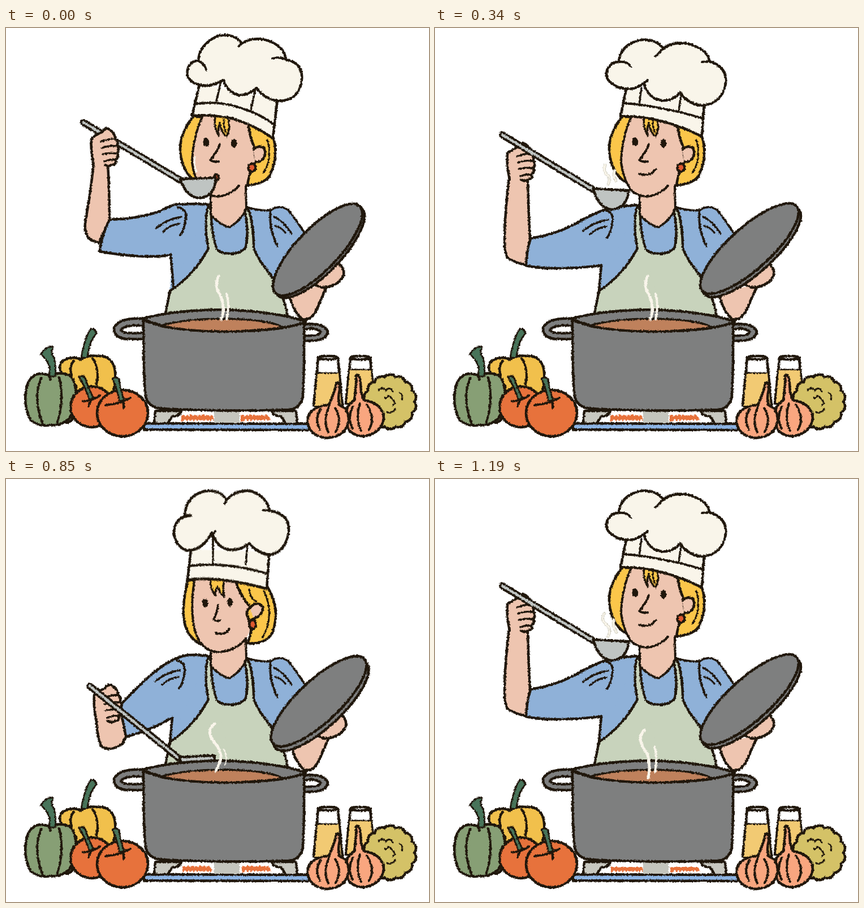
Write an HTML page that moves like this. It is 748 by 748 pixels and loops after 1360 ms.

```html
<!DOCTYPE html>
<html lang="en">
<head>
<meta charset="utf-8">
<title>Tasting the soup</title>
<style>
html, body { margin: 0; width: 100%; height: 100%; overflow: hidden; background: #fff; }
svg { display: block; width: 100vw; height: 100vh; }
</style>
</head>
<body>
<svg viewBox="0 0 748 748">
  <defs>
    <filter id="rough" filterUnits="userSpaceOnUse" x="0" y="0" width="748" height="748" color-interpolation-filters="sRGB">
      <feTurbulence type="fractalNoise" baseFrequency="0.35" numOctaves="2" seed="4"/>
      <feDisplacementMap in="SourceGraphic" scale="4" xChannelSelector="R" yChannelSelector="G"/>
    </filter>
  </defs>
  <g filter="url(#rough)" stroke-linecap="round" stroke-linejoin="round">
    <g id="cook"></g>
    <g id="still"></g>
    <g id="steam"></g>
  </g>
</svg>
<script>
const INK = '#20170c', SKIN = '#eec5b0', HAIR = '#fbc64a', BLUE = '#8fb1d8', SAGE = '#c8d3bc',
  IRON = '#7e7f7f', CREAM = '#f9f5ea', STEEL = '#bfc4c2', LEAF = '#48745a', ORANGE = '#e7723c',
  BEER = '#f2ca73', GARLIC = '#f9a67f';
const STEP = 170;
const $ = id => document.getElementById(id);

const path = (d, fill = 'none', stroke = INK, w = 4.5) =>
  `<path d="${d}" fill="${fill}" stroke="${stroke}" stroke-width="${w}"/>`;
const flat = (d, fill) => path(d, fill, 'none');
const line = (d, w = 4) => path(d, 'none', INK, w);
const oval = (x, y, rx, ry, fill, turn = 0, stroke = INK) =>
  `<ellipse rx="${rx}" ry="${ry}" fill="${fill}" stroke="${stroke}" stroke-width="4.5" transform="translate(${x} ${y}) rotate(${turn})"/>`;
const move = (x, y, body) => `<g transform="translate(${x} ${y})">${body}</g>`;

// Kitchen objects
function scallop(cx, cy, rx, ry, n) {
  const at = k => {
    const a = k / n * 2 * Math.PI - 1.8;
    return (cx + rx * Math.cos(a)).toFixed(1) + ' ' + (cy + ry * Math.sin(a)).toFixed(1);
  };
  let d = 'M' + at(0);
  for (let k = 1; k <= n; k++) d += `A12.5 12.5 0 0 1 ${at(k)}`;
  return d + 'Z';
}

function flame(x0, x1, kind) {
  const round = kind % 2 === 0;
  let d = `M${x0 + kind} 696L${x0 + kind} 686`;
  for (let x = x0 + kind; x < x1 - 7; x += 7)
    d += round ? `q3.5 ${-5 + (x + kind) % 3} 7 0` : 'l7 0';
  d += 'L' + x1 + ' 695';
  for (let x = x1; x > x0 + 7; x -= 6) d += 'l-3 -3l-3 3';
  return flat(d + 'Z', ORANGE);
}

const stove = kind =>
  path('M244 699L536 700L536 711L244 710Z', '#8db4e4') +
  path('M262 697L264 677L310 677Q308 686 294 687L287 697', '#c8c8c0') +
  path('M515 697L513 677L470 677Q472 686 487 687L493 697', '#c8c8c0') +
  flame(310, 368, kind) + flame(415, 469, kind) +
  flat('M368 678L413 678L413 698L368 698Z', '#c4c5bd');

const pot =
  path('M241 514Q200 512 191 530Q190 548 214 550L242 550', IRON) +
  path('M240 526Q212 524 203 533Q205 542 240 539', '#fff') +
  path('M527 524Q560 520 569 536Q569 550 546 553L526 553', IRON) +
  path('M529 532Q550 530 557 537Q554 545 529 544', '#fff') +
  path('M243 516Q243 600 246 648Q250 671 275 673Q390 679 500 675Q522 673 525 650Q528 590 527 520Z', IRON) +
  path('M241 514Q300 498 388 498Q480 502 530 519Q500 535 388 537Q285 535 241 514Z', IRON) +
  path('M273 527Q310 514 390 514Q470 516 491 530Q460 536 388 536.5Q310 536 273 527Z', '#bf815c', INK, 3.5) +
  line('M243 517Q290 536 388 537Q490 534 528 521');

const vegetables =
  path('M132 586Q112 578 97 592Q93 602 98 609L124 632L125 650L188 650Q196 620 192 602Q186 578 160 580Q145 578 132 586Z', '#f1c04c') +
  line('M120 588Q111 600 116 614') + line('M153 584Q166 602 160 630') +
  path('M133 584Q138 550 150 532Q158 531 160 540Q148 552 144 582Z', LEAF, INK, 3) +
  path('M98 694Q112 704 119 688L112 670Z', '#879f75') +
  path('M77 614Q48 604 38 630Q28 665 44 694Q60 706 78 702Q94 704 104 696Q119 690 123 660Q126 625 112 614Q94 607 77 614Z', '#879f75') +
  line('M62 619Q47 655 65 700') + line('M94 617Q104 660 90 700') + line('M77 616L78 622') +
  path('M76 616Q82 595 62 577Q68 564 82 563Q83 569 80 573Q90 590 87 616Z', LEAF, INK, 3) +
  oval(152, 670, 38, 36, ORANGE) + line('M136 660Q150 660 166 650') + line('M152 657Q146 664 146 669') +
  path('M129 617Q136 613 140 619Q146 638 155 655L147 656Q140 634 129 617Z', LEAF, INK, 3) +
  oval(206, 681, 45, 41, ORANGE) + line('M176 667Q200 665 220 654') + line('M206 660Q209 666 208 672') +
  path('M188 620Q196 615 200 622Q202 640 209 658L201 660Q197 640 188 620Z', LEAF, INK, 3);

function glass(l, r, foam, end) {
  return path(`M${l} 584L${r} 584L${r + 8} ${end}L${l - 8} ${end}Z`, '#fff') +
    flat(`M${l - 1} ${foam}L${r + 1} ${foam}L${r + 6} ${end}L${l - 6} ${end}Z`, BEER) +
    line(`M${l} ${foam}L${r} ${foam}`, 2.5) +
    oval((l + r) / 2, 583, (r - l) / 2, 3, '#fff');
}

const pantry =
  glass(552, 587, 610, 668) + glass(609, 644, 604, 664) +
  path(scallop(679, 661, 43, 45, 14), '#d4c267') +
  line('M659 641q7 -8 12 0q8 -8 13 2', 3) + line('M670 655q9 -8 13 2q8 6 1 10', 3) +
  line('M674 679q9 4 14 -5', 3) + line('M697 645q6 6 3 12', 3) +
  path('M616 658Q620 630 619 614Q626 610 627 630Q628 650 633 658Q667 664 668 690Q664 717 632 722Q602 720 600 692Q600 668 616 658Z', GARLIC) +
  line('M626 664Q617 690 628 712') + line('M638 666Q654 690 642 710') + line('M613 670Q603 690 613 708') +
  path('M571 666Q581 645 584 628Q591 623 590 640Q586 656 590 667Q606 672 606 694Q602 722 568 725Q535 722 533 694Q535 670 571 666Z', GARLIC) +
  line('M571 670Q560 695 570 715') + line('M582 672Q595 692 583 714') + line('M556 674Q545 692 555 710');

// Head, seen turned aside
const neck =
  flat('M362 285L362 330Q382 351 396 352Q419 337 425 318L425 250Z', SKIN) +
  line('M362 298L362 331Q382 351 396 352Q419 337 425 318L424 278');

const sideHead =
  path('M332 156Q307 185 308 218Q311 255 336 272L350 158Z', HAIR) +
  flat('M345 155Q330 195 330 235Q335 275 350 290Q365 300 382 297Q405 290 425 276L442 235L430 160Z', SKIN) +
  line('M347 157Q330 195 329 238Q335 275 350 290Q365 300 382 297Q402 291 412 279') +
  path('M428 164Q430 192 440 213L440 238Q430 255 427 278Q455 276 466 262Q483 225 472 192Z', HAIR) +
  line('M462 198Q472 232 455 256', 3) +
  path('M438 215Q446 206 456 212Q462 225 452 234Q445 239 440 236', SKIN) +
  flat('M436 218L441 236L432 240Z', SKIN) +
  oval(435, 247, 6.5, 7, '#df5a30') +
  path('M370 156Q367 175 376 190Q374 178 378 168Q380 184 390 192Q398 176 392 158', HAIR, INK, 3.5) +
  line('M385 162Q385 176 389 184', 3);

const frontHead =
  path('M322 178Q312 215 314 245Q318 280 346 293L345 180Z', HAIR) +
  flat('M333 178Q325 230 334 268Q345 305 375 306Q410 304 426 280L442 240L414 175Z', SKIN) +
  line('M333 180Q325 230 334 268Q345 305 375 306Q408 304 424 282') +
  path('M406 180Q416 210 432 226Q422 236 428 245L434 262Q432 280 427 291Q460 292 471 272Q486 230 463 192Z', HAIR) +
  line('M430 195Q432 212 442 216', 3) + line('M456 198Q476 240 454 280', 3) +
  path('M431 228Q444 214 454 226Q455 241 438 247', SKIN) +
  oval(436, 257, 6, 8, '#df5a30') +
  path('M361 178Q362 196 370 206Q370 196 374 190Q378 202 386 209Q382 194 386 180', HAIR, INK, 3.5);

const eyes = (x1, y1, x2, y2) =>
  oval(x1, y1, 3, 5.5, INK) + oval(x2, y2, 3, 5.5, INK);
const sideNose = line('M378 206Q372 221 361 234Q370 238 376 236');

const faces = {
  sip: sideHead + eyes(354, 202, 403, 204) + sideNose + oval(372, 264, 4, 5, '#c24a2c'),
  savour: sideHead + line('M345 203q6 9 13 0') + line('M392 208q8 9 16 0') +
    line('M376 211Q371 228 362 238Q367 241 373 239') + oval(372, 264, 3, 3, '#c24a2c'),
  smile: sideHead + eyes(354, 201, 404, 204) + sideNose + line('M361 258Q380 264 390 250'),
  front: frontHead + eyes(352, 219, 396, 218) + line('M375 223Q373 238 367 249Q374 252 378 250') +
    line('M371 272Q388 278 395 265')
};

const hat = (band, stripe, pleats, puff, detail) =>
  path(band, CREAM) + line(stripe) + line(pleats, 3.5) + path(puff, CREAM) + line(detail);

const hats = {
  sip: hat('M342 100L329 155Q360 152 400 160Q440 172 472 195L480 126', 'M335 134Q380 128 420 143Q455 155 475 172',
    'M380 95L372 130M441 108L433 145',
    'M340 58Q342 28 375 14Q402 8 417 27Q440 13 468 24Q493 35 495 56Q526 62 523 92Q518 128 484 129Q460 128 443 106Q420 126 402 115Q390 108 384 92Q362 106 340 100Q315 92 322 70Q328 57 340 58Z',
    'M340 58Q352 64 354 74M472 54Q484 50 495 56M417 27L412 32'),
  savour: hat('M341 98L330 155Q400 150 470 186L476 126', 'M334 131Q400 128 474 160',
    'M384 92L378 126M440 110L434 139',
    'M338 54Q345 20 380 14Q402 13 416 27Q440 11 468 28Q488 40 490 56Q528 64 524 95Q515 130 482 131Q462 128 446 107Q425 122 405 114Q392 106 386 92Q365 106 340 99Q309 90 316 68Q322 54 338 54Z',
    'M338 54Q350 56 355 66M478 57L490 56M416 27L408 35'),
  smile: hat('M339 104L328 156Q400 155 472 192L476 132', 'M335 133Q400 138 474 160',
    'M365 106L361 136M435 118L431 147',
    'M325 60Q328 28 365 21Q390 19 404 36Q425 21 455 30Q484 41 485 59Q517 68 514 98Q508 135 470 137Q445 133 434 114Q415 134 390 126Q374 116 369 98Q350 113 325 105Q299 95 304 75Q310 60 325 60Z',
    'M325 60Q340 58 346 68M472 60L485 59M404 36L390 50M369 98L376 92'),
  front: hat('M327 128L321 178Q380 172 461 193L466 132', 'M327 155Q390 148 462 168',
    'M366 106L366 150M427 118L424 153',
    'M316 72Q318 40 350 32Q378 28 390 46Q408 28 435 32Q462 42 466 64Q502 69 500 98Q495 133 465 137Q445 134 430 118Q410 134 385 126Q370 118 364 100Q348 130 320 130Q298 122 297 98Q300 73 326 72Z',
    'M316 72L327 72M455 63L466 64M390 46L387 52M364 106L370 98')
};

// Limbs and tools
const fist =
  path('M155 242Q149 215 151 196Q160 188 170 184Q176 174 184 180Q193 187 193 195Q200 203 196 208Q202 214 197 221Q200 229 193 233Q198 240 188 242Q182 246 175 242', SKIN) +
  line('M168 201Q180 196 193 196', 3.5) + line('M170 212Q184 207 196 209', 3.5) +
  line('M171 223Q184 220 196 222', 3.5) + line('M174 236Q184 232 193 233', 3.5);

const ladle = (x, y, bx, by, turn) => {
  const rod = `M${x} ${y}L${bx} ${by + 2}`;
  return path(rod, 'none', INK, 12) + path(rod, 'none', STEEL, 4.5) +
    `<g transform="translate(${bx} ${by}) rotate(${turn})">` +
    path('M0 0L63 0Q61 33 33 35Q10 33 0 0Z', STEEL) + '</g>';
};

const lid = (x, y, rx, turn, rim) =>
  oval(x + 4, y + rim, rx, 37, IRON, turn) + oval(x, y, rx, 37, IRON, turn);

const rightArm =
  path('M499 465Q506 500 524 515Q540 519 551 494L568 455', SKIN) +
  path('M580 411Q600 422 597 437Q588 457 560 459Q548 456 540 450', SKIN);

const torso =
  flat('M300 318L360 312L427 316Q450 324 468 322Q484 312 500 322Q516 342 532 370L478 448L440 395L380 440L290 464L294 400Z', BLUE) +
  line('M430 318Q450 324 468 322Q484 312 498 321Q514 340 530 366') +
  line('M468 322Q464 352 480 386') + line('M474 334Q490 340 505 364', 3.5) + line('M476 350Q486 352 494 362', 3.5) +
  path('M357 314Q350 350 358 390Q332 438 290 465L282 506L498 510Q492 470 466 434Q440 402 438 386Q438 345 427 317L422 322Q430 360 424 388Q415 400 395 399Q374 398 371 387Q362 355 363 332Z', SAGE);

const folds = line('M304 317Q322 320 317 342Q314 360 308 366') +
  line('M266 354Q284 338 310 334', 3.5) + line('M278 360Q290 348 307 346', 3.5);

const poses = {
  sip: {
    face: 'sip', hand: [0, 0], ladle: [137, 167, 308, 267, -2], lid: [551, 392, 107, -46, 4], arm: 0, fold: [0, 0],
    fore: 'M155 238Q150 290 140 345Q138 372 156 377L164 380L183 340Q183 290 180 240',
    sleeve: 'M358 312Q330 310 314 312Q300 308 270 325Q230 338 183 339Q172 360 165 395Q200 402 245 404Q280 404 291 401L296 457'
  },
  savour: {
    face: 'savour', hand: [-6, 20], ladle: [130, 187, 309, 268, -4], lid: [551, 394, 109, -43, 6], arm: 4, fold: [3, -2],
    fore: 'M149 258Q143 310 137 350Q135 377 158 387L169 392L184 343Q185 300 180 262',
    sleeve: 'M358 313Q330 313 318 318Q302 305 278 320Q240 338 184 343Q175 365 167 393Q220 405 298 402L292 464'
  },
  smile: {
    face: 'smile', hand: [-23, 26], ladle: [119, 189, 280, 284, 3], lid: [556, 390, 112, -42, 6], arm: 2, fold: [-4, 5], over: true,
    fore: 'M131 266Q124 320 123 370Q122 400 130 408Q145 416 161 419L168 372Q165 320 164 268',
    sleeve: 'M358 313Q320 316 305 320Q285 325 245 348Q210 366 169 372Q162 395 161 420Q200 430 294 420L290 466'
  },
  lower: {
    face: 'front', hand: [-12, 119], ladle: [132, 300, 300, 405, -3], lid: [553, 393, 110, -43, 8], arm: 4, fold: [-2, 2], over: true,
    fore: 'M146 358Q158 390 150 435Q155 446 175 445Q187 443 190 436L188 384Q183 370 182 355',
    sleeve: 'M358 313Q320 308 305 315Q285 322 250 345Q215 370 188 384Q191 415 190 438Q240 436 294 413L290 466'
  },
  scoop: {
    face: 'front', hand: [5, 186], ladle: [148, 366, 306, 492, -3], lid: [553, 393, 110, -43, 8], arm: 4, fold: [-2, 4], over: true, lift: 1.07,
    fore: 'M160 426Q160 450 168 472Q182 484 206 468L214 452L200 405L185 420',
    sleeve: 'M358 313Q320 308 305 316Q285 322 252 350Q218 382 200 402Q208 430 212 456Q252 446 294 422L290 466'
  }
};

function figure(p) {
  const rod = ladle(...p.ladle), hand = move(...p.hand, fist);
  let top = hats[p.face];
  if (p.lift) top = `<g transform="translate(0 178) scale(1 ${p.lift}) translate(0 -178)">${top}</g>`;
  return torso + path(p.fore, SKIN) + path(p.sleeve, BLUE) + move(...p.fold, folds) +
    flat('M357 314Q350 350 358 390Q332 438 290 465L282 506L400 506L371 387Q362 355 363 332Z', SAGE) +
    line('M357 314Q350 350 358 390Q332 438 290 465L282 506') + line('M363 332Q362 355 371 387Q374 398 395 399') +
    neck + faces[p.face] + top +
    (p.over ? hand + rod : rod + hand) + move(p.arm, 0, rightArm) + lid(...p.lid);
}

// Steam: large wisps above the pot, small ones above the ladle
const wisp = (d, w = 5) => path(d, 'none', CREAM, w);
const pale = d => path(d, 'none', '#cfcdbf', 5) + wisp(d, 3);
const potSteam = [
  wisp('M376 439Q367 455 380 475Q388 495 381 515') + wisp('M390 470Q396 490 390 515', 4),
  wisp('M369 433Q352 445 368 465Q385 485 378 502L371 516') + wisp('M385 478Q393 492 387 506', 2),
  wisp('M370 444Q355 460 375 485Q382 505 377 529') + wisp('M388 474Q394 490 389 518', 4),
  wisp('M360 430Q355 445 368 460Q376 475 357 488') + wisp('M377 416Q370 430 382 455Q388 475 374 497L373 516')
];
const cupSteam = [
  wisp('M334 228Q332 240 336 254', 3),
  wisp('M340 228q-5 8 2 14q6 6 1 14', 3) + wisp('M350 234q-4 8 2 12q4 5 0 12', 3),
  pale('M299 238Q292 250 305 259Q312 268 306 278') + pale('M316 249Q313 260 321 271'),
  wisp('M328 361Q321 370 330 377Q333 382 329 388', 4) + wisp('M338 351Q331 360 338 365Q341 370 337 375', 4),
  pale('M301 242Q296 254 307 262Q310 270 306 276') + pale('M318 252Q314 262 320 270'),
  ''
];

// pose, flame, pot steam, ladle steam
const beats = [
  ['sip', 0, 0, 0], ['savour', 1, 1, 1], ['smile', 0, 0, 4], ['smile', 1, 2, 2],
  ['lower', 2, 3, 3], ['scoop', 2, 1, 5], ['lower', 3, 3, 3], ['smile', 1, 2, 2]
];

let shown = -1;
function draw(ms) {
  const i = Math.floor(ms / STEP) % beats.length;
  if (i === shown) return;
  shown = i;
  const [pose, fire, big, small] = beats[i];
  $('cook').innerHTML = figure(poses[pose]);
  $('still').innerHTML = stove(fire) + pot + vegetables + pantry;
  $('steam').innerHTML = potSteam[big] + cupSteam[small];
}

const start = performance.now();
function tick() {
  draw(performance.now() - start);
  requestAnimationFrame(tick);
}
tick();
</script>
</body>
</html>
```
